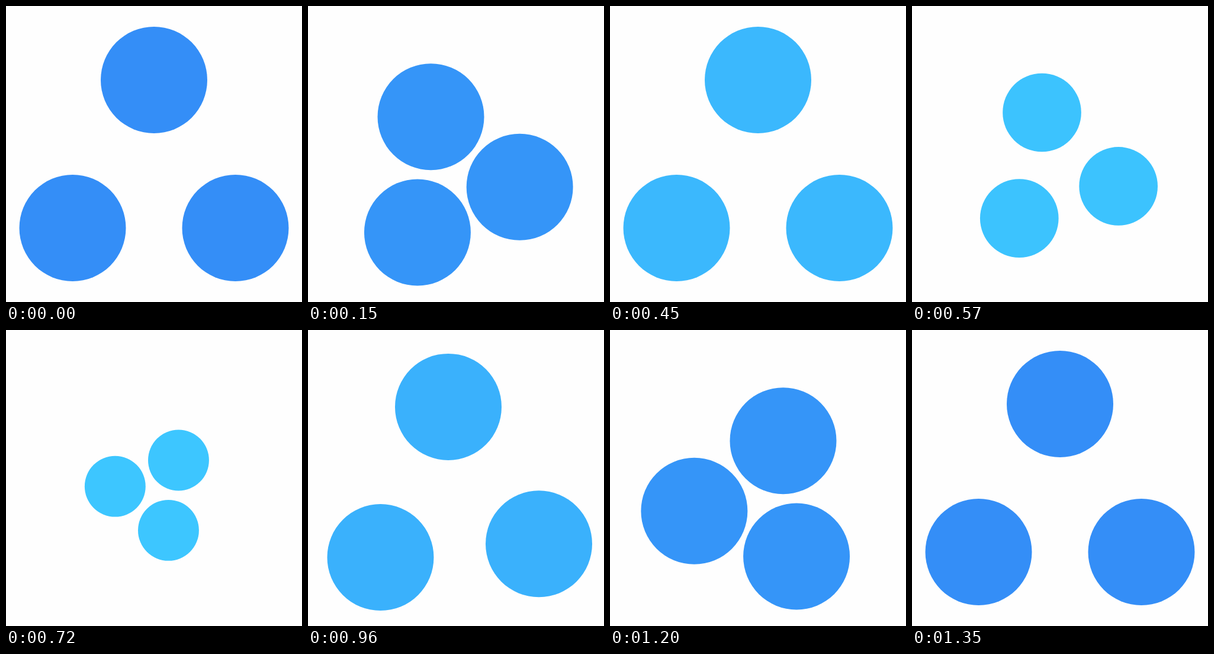
Write an HTML page that moves like this. It is 500 by 500 pixels and loops after 1380 ms.

```html
<!DOCTYPE html>
<html lang="en">
<head>
<meta charset="utf-8">
<title>Three orbiting dots</title>
<style>
  html, body { margin: 0; width: 100%; height: 100%; overflow: hidden; background: #fefefe; }
  svg { display: block; width: 100%; height: 100%; }
</style>
</head>
<body>
<svg id="stage" viewBox="0 0 500 500"></svg>
<script>
const NS = 'http://www.w3.org/2000/svg';
const STEP = 30, STEPS = 46, LEG = 15, MID = 22.5;
const RADIUS = 90, CENTER = 250, MIN_SCALE = 0.522;
const DARK = [52, 142, 247], LIGHT = [61, 199, 255];
const CORNERS = [[250, 125], [112.5, 375], [387.5, 375]];

const stage = document.getElementById('stage');
const make = name => document.createElementNS(NS, name);
const ease = x => x * x * (3 - 2 * x);
const mix = (a, b, k) => a + (b - a) * k;

// Smooth curves through a circle's four stops, one per leg.
function buildLegs(first) {
  const stops = [0, 1, 2, 3].map(i => CORNERS[(first + i) % 3]);
  const tangent = i => {
    const a = stops[Math.max(i - 1, 0)], b = stops[Math.min(i + 1, 3)];
    return [(b[0] - a[0]) / 6, (b[1] - a[1]) / 6];
  };
  return [0, 1, 2].map(i => {
    const p = stops[i], q = stops[i + 1], t = tangent(i), u = tangent(i + 1);
    const path = make('path');
    path.setAttribute('d', `M${p}C${p[0] + t[0]},${p[1] + t[1]} ${q[0] - u[0]},${q[1] - u[1]} ${q}`);
    return { path, length: path.getTotalLength() };
  });
}

const dots = [0, 1, 2].map(first => ({
  node: stage.appendChild(make('circle')),
  legs: buildLegs(first)
}));

function draw(now) {
  const step = Math.floor(now / STEP + 1e-3) % STEPS;
  const leg = Math.min(Math.floor(step / LEG), 2);
  const along = ease((step - leg * LEG) / LEG);
  const fromMid = Math.abs(step - MID);

  const scale = mix(MIN_SCALE, 1, ease(Math.min(fromMid / (LEG / 2), 1)));
  const glow = ease(1 - fromMid / MID);
  const fill = `rgb(${DARK.map((c, i) => Math.round(mix(c, LIGHT[i], glow)))})`;

  for (const { node, legs } of dots) {
    const { path, length } = legs[leg];
    const p = path.getPointAtLength(along * length);
    node.setAttribute('cx', mix(CENTER, p.x, scale));
    node.setAttribute('cy', mix(CENTER, p.y, scale));
    node.setAttribute('r', RADIUS * scale);
    node.setAttribute('fill', fill);
  }
}

function tick(now) {
  draw(now);
  requestAnimationFrame(tick);
}
draw(0);
requestAnimationFrame(tick);
</script>
</body>
</html>
```
